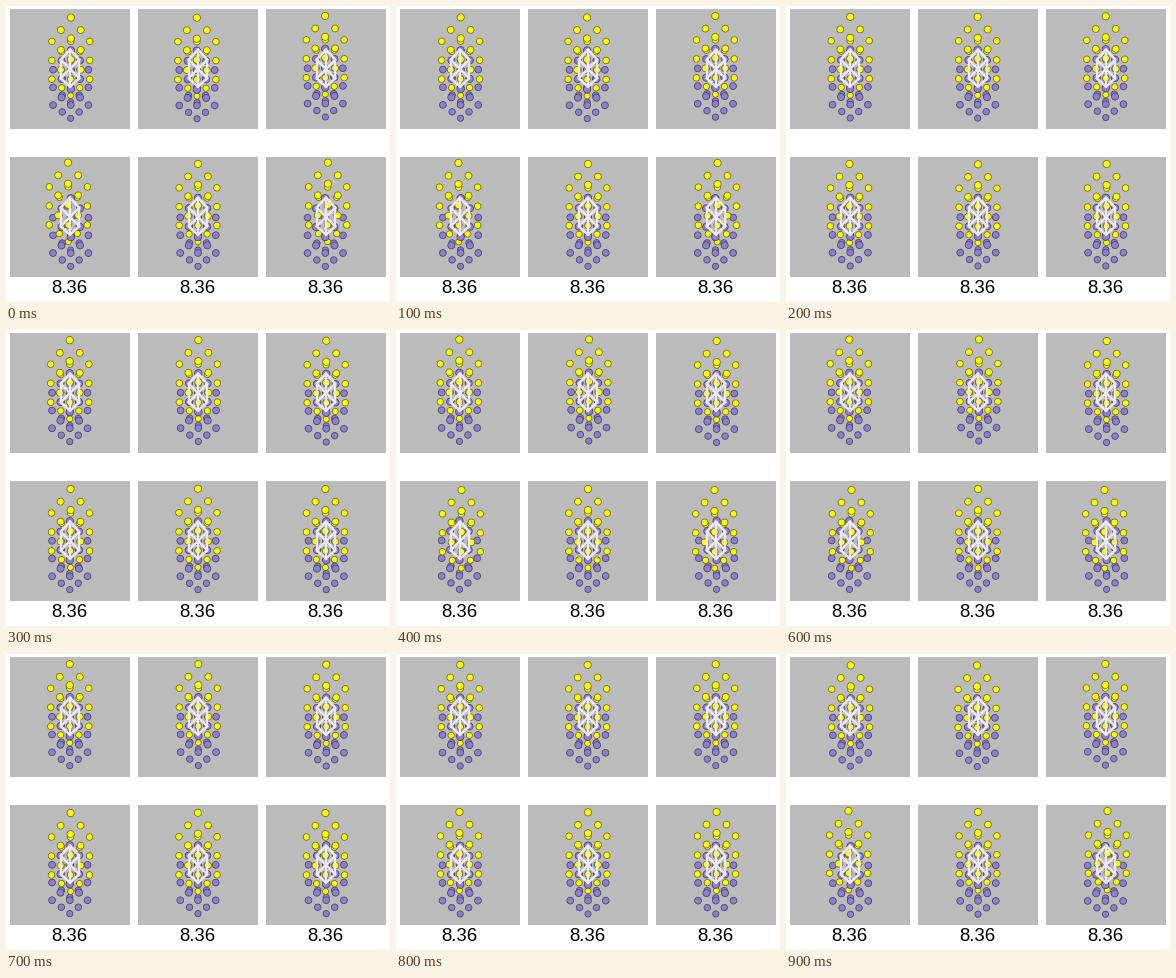
Recreate the animation shown at these times as a matplotlib script. Size 384 by 296 pixels, loop 1 s.

```python
import itertools

import matplotlib.pyplot as plt
import numpy as np
from matplotlib.animation import FuncAnimation
from matplotlib.patches import Circle, Rectangle

W, H, DPI = 384, 296, 100
FRAMES, INTERVAL = 10, 100
PX = 72 / DPI
SIDE, GAP_X, GAP_Y = 120, 128, 148
YELLOW, PURPLE = "#ffff00", "#8f7dd0"
R = np.sqrt(0.5)

# Face-centred cubic lattice as (right, down, away), bond length 1
LATTICE = np.array([(-0.5, 0.5, R), (0.5, 0.5, R), (0, 1, 0)])
PURPLE_ORIGIN = np.array([0, -1, 1.5 * R])
YELLOW_ORIGIN = PURPLE_ORIGIN - 0.75 * LATTICE.sum(axis=0)

RIGHT, DOWN, AWAY = np.eye(3)


def mode_directions():
    """Three orthogonal acoustic directions, then three optical ones."""
    diagonal = R * (RIGHT + DOWN)
    tilt = np.radians(24)
    lift = -np.cos(tilt) * DOWN - np.sin(tilt) * AWAY
    normal = -np.sin(tilt) * DOWN + np.cos(tilt) * AWAY
    acoustic = [R * (AWAY + diagonal), R * (DOWN - RIGHT), R * (AWAY - diagonal)]
    optical = [R * (lift - RIGHT), normal, R * (lift + RIGHT)]
    return [acoustic, optical]


def scale(depth):
    return 1 / (1 / 21 + 0.00356 * depth)


def project(center, point):
    return np.array(center) + scale(point[2]) * point[:2]


fig = plt.figure(figsize=(W / DPI, H / DPI), dpi=DPI, facecolor="white")
ax = fig.add_axes([0, 0, 1, 1])
ax.set_xlim(0, W)
ax.set_ylim(H, 0)
ax.axis("off")


def draw_cell(center):
    corners = list(itertools.product((0, 1), repeat=3))
    for p, q in itertools.combinations(corners, 2):
        if sum(a != b for a, b in zip(p, q)) == 1:
            ends = [project(center, PURPLE_ORIGIN + c @ LATTICE) for c in (p, q)]
            ax.plot(*zip(*ends), color="#ece8f6", lw=2.5 * PX, zorder=30,
                    solid_capstyle="round")


def add_atoms(center, origin, shift, color, edge, size):
    for ijk in itertools.product(range(3), repeat=3):
        home = origin + ijk @ LATTICE
        dot = Circle((0, 0), 1, fc=color, ec=edge, lw=0.8 * PX, zorder=20 - home[2])
        ax.add_patch(dot)
        atoms.append((dot, center, home, shift, size))


atoms = []
for row, directions in enumerate(mode_directions()):
    yellow_amp, purple_amp = (0.127, -0.057) if row else (0.082, 0.082)
    for col, direction in enumerate(directions):
        cx, cy = center = (64 + GAP_X * col, 63 + GAP_Y * row)
        ax.add_patch(Rectangle((cx - SIDE / 2, cy - SIDE / 2), SIDE, SIDE,
                               fc="#bbbbbb", lw=0, zorder=1))
        add_atoms(center, YELLOW_ORIGIN, yellow_amp * direction,
                  YELLOW, "#6e6e1c", 0.172)
        add_atoms(center, PURPLE_ORIGIN, purple_amp * direction,
                  PURPLE, "#4a4466", 0.19)
        draw_cell(center)
        if row:
            ax.text(cx - 0.5, 287, "8.36", ha="center", va="baseline",
                    fontname="Liberation Sans", fontsize=18.6 * PX, color="black")


def update(frame):
    swing = np.cos(2 * np.pi * frame / FRAMES)
    for dot, center, home, shift, size in atoms:
        point = home + swing * shift
        dot.center = project(center, point)
        dot.radius = size * scale(point[2])
    return [atom[0] for atom in atoms]


anim = FuncAnimation(fig, update, frames=FRAMES, interval=INTERVAL, repeat=True)
plt.show()
```
